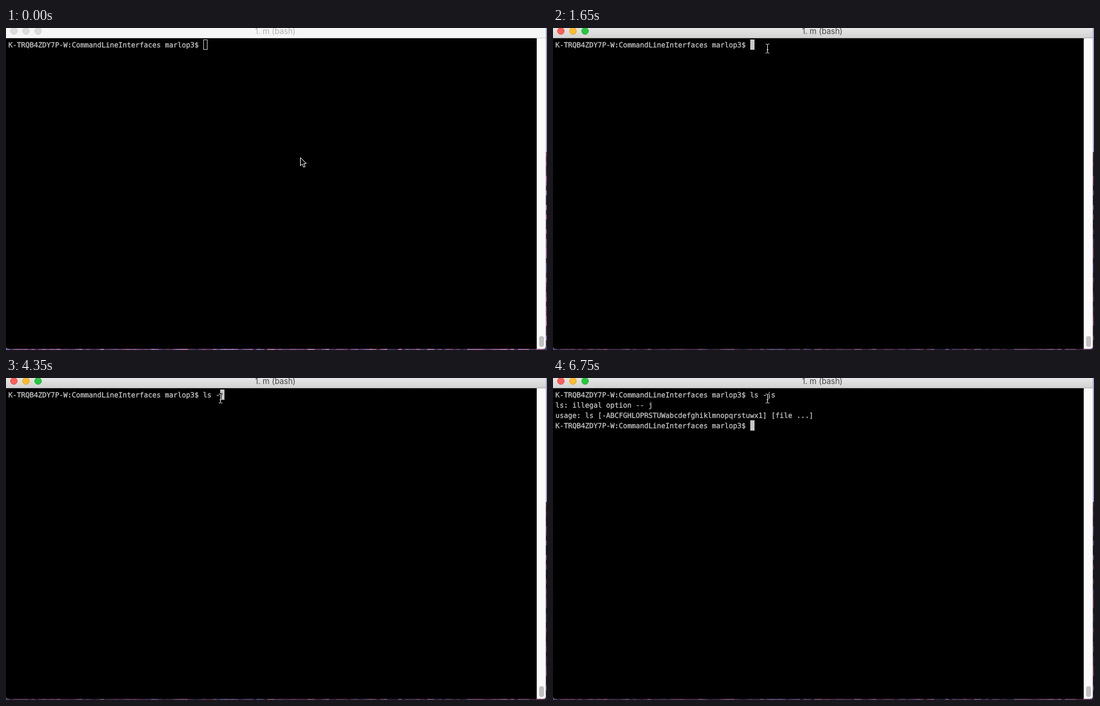
An HTML page that plays this animation: 894 by 533 pixels, repeating every 8 s.

```html
<!DOCTYPE html>
<html lang="en">
<head>
<meta charset="utf-8">
<title>Terminal session</title>
<style>
  html, body { margin: 0; width: 100%; height: 100%; overflow: hidden; background: #000; }
  svg { position: absolute; left: 0; top: 0; display: block; }
  .line {
    font: 11.627px "DejaVu Sans Mono", monospace;
    fill: #c7c7c7; stroke: #c7c7c7; stroke-width: .3px;
    white-space: pre; text-rendering: geometricPrecision;
  }
  .title { font: 13px Inter, sans-serif; text-anchor: middle; fill: #b2b2b2; }
  .bar { fill: #f6f6f6; }
  .edge { fill: #d4d4d4; }
  .light { fill: #dcdcdc; stroke: #cfcfcf; }
  .caret { fill: none; stroke: #c7c7c7; }
  .shade { fill: #000; opacity: 0; }
  .active .title { fill: #474747; }
  .active .bar { fill: url(#chrome); }
  .active .edge { fill: #afafaf; }
  .active .light { fill: var(--on); stroke: var(--rim); }
  .active .caret { fill: #c7c7c7; }
  .active .shade { opacity: .35; }
</style>
</head>
<body>
<svg id="stage" width="894" height="533" viewBox="0 0 894 533">
  <defs>
    <linearGradient id="chrome" x2="0" y2="1">
      <stop stop-color="#e6e6e6"/><stop offset="1" stop-color="#d3d3d3"/>
    </linearGradient>
  </defs>

  <g id="desktop"></g>
  <rect class="shade" y="531" width="894" height="2"/>
  <rect class="shade" x="892" y="205" width="2" height="328"/>

  <path d="M0 0H892V527Q892 531 888 531H4Q0 531 0 527Z"/>
  <path d="M877 17H892V527Q892 531 888 531H877Z" fill="#fafafa"/>
  <rect x="881" y="510" width="8" height="18" rx="4" fill="#c1c1c1"/>

  <rect class="bar" width="892" height="16"/>
  <rect class="edge" y="16" width="892" height="1"/>
  <circle class="light" cx="13" cy="5" r="5.5" style="--on:#ff5f57;--rim:#e2463f"/>
  <circle class="light" cx="33" cy="5" r="5.5" style="--on:#ffbd2e;--rim:#e1a116"/>
  <circle class="light" cx="53" cy="5" r="5.5" style="--on:#28c940;--rim:#12ac28"/>
  <text class="title" x="445" y="10">1. m (bash)</text>

  <g id="lines"></g>
  <rect id="caret" class="caret" x=".5" y=".5" width="6" height="16"/>

  <path id="arrow" d="M.5 .5V14L3.6 11.2L5.9 16.4L8.3 15.4L6 10.3H10.3Z" fill="#000" stroke="#fff"/>
  <g id="beam" fill="none">
    <path id="beamShape" d="M-3-7.5H-2Q0-7.5 0-5.5V5.5Q0 7.5-2 7.5H-3M3-7.5H2Q0-7.5 0-5.5M0 5.5Q0 7.5 2 7.5H3M-1.5 2H1.5" stroke="#000" stroke-width="2.6"/>
    <use href="#beamShape" style="stroke:#fff"/>
    <path d="M-3-7.5H-2Q0-7.5 0-5.5V5.5Q0 7.5-2 7.5H-3M3-7.5H2Q0-7.5 0-5.5M0 5.5Q0 7.5 2 7.5H3M-1.5 2H1.5" stroke="#e8e8e8"/>
  </g>
</svg>
<script>
const LOOP = 8000, FOCUS = 1200, ENTER = 6750;
const CELL = 7, ROW = 17, LEFT = 4, TOP = 19;
const PROMPT = "K-TRQB4ZDY7P-W:CommandLineInterfaces marlop3$ ";
const REPLY = [
  "ls: illegal option -- j",
  "usage: ls [-ABCFGHLOPRSTUWabcdefghiklmnopqrstuwx1] [file ...]",
  PROMPT
];

// [start ms, x, y]; the arrow becomes a text beam once the window has focus
const pointer = [
  [0, 486, 214], [750, 484, 192], [900, 384, 99], [1050, 372, 83],
  [1200, 372.5, 85], [1350, 345.5, 49], [1500, 353.5, 37], [1650, 354.5, 34]
];
const typing = [
  [0, ""], [2250, "l"], [2400, "l s"], [2550, "l s-l"],
  [3150, "l s-"], [3300, "l s"], [3450, "l "], [3600, "l"],
  [3900, "ls"], [4200, "ls "], [4350, "ls -"], [4950, "ls -l"],
  [5550, "ls -"], [6000, "ls -j"], [6150, "ls -js"]
];

const $ = id => document.getElementById(id);
const latest = (steps, t) => steps.findLast(step => step[0] <= t);
const moveTo = (el, x, y) => el.setAttribute("transform", `translate(${x} ${y})`);

function add(parent, tag, attrs) {
  const el = document.createElementNS("http://www.w3.org/2000/svg", tag);
  for (const name in attrs) el.setAttribute(name, attrs[name]);
  return parent.appendChild(el);
}

// Slivers of wallpaper below and beside the window
function paintDesktop() {
  let seed = 7;
  const random = () => (seed = seed * 16807 % 2147483647) / 2147483647;
  const tone = () => `hsl(${250 + random() * 75} 24% ${22 + random() * 34}%)`;
  const box = (x, y, width, height, fill) => add($("desktop"), "rect", { x, y, width, height, fill });
  for (let x = 0; x < 894; x += 6) box(x, 526, 6, 7, tone());
  for (let y = 205; y < 533; y += 8) box(891, y, 3, 8, tone());
  box(891, 0, 3, 205, "#a9a1d0");
}

const rows = [PROMPT, ...REPLY].map((_, i) =>
  add($("lines"), "text", { class: "line", x: LEFT, y: TOP + 13 + i * ROW }));

function draw(t) {
  const focused = t >= FOCUS;
  const command = latest(typing, t)[1];
  const lines = [PROMPT + command, ...(t >= ENTER ? REPLY : [])];
  rows.forEach((row, i) => {
    const text = lines[i] || "";
    if (row.textContent !== text) row.textContent = text;
  });
  const last = lines.length - 1;
  moveTo($("caret"), LEFT + lines[last].length * CELL, TOP + last * ROW);

  const [, x, y] = latest(pointer, t);
  const shown = $(focused ? "beam" : "arrow");
  moveTo(shown, x, y);
  $("beam").style.display = focused ? "" : "none";
  $("arrow").style.display = focused ? "none" : "";
  $("stage").classList.toggle("active", focused);
}

const start = performance.now();
function tick() {
  draw((performance.now() - start) % LOOP);
  requestAnimationFrame(tick);
}
paintDesktop();
tick();
</script>
</body>
</html>
```
